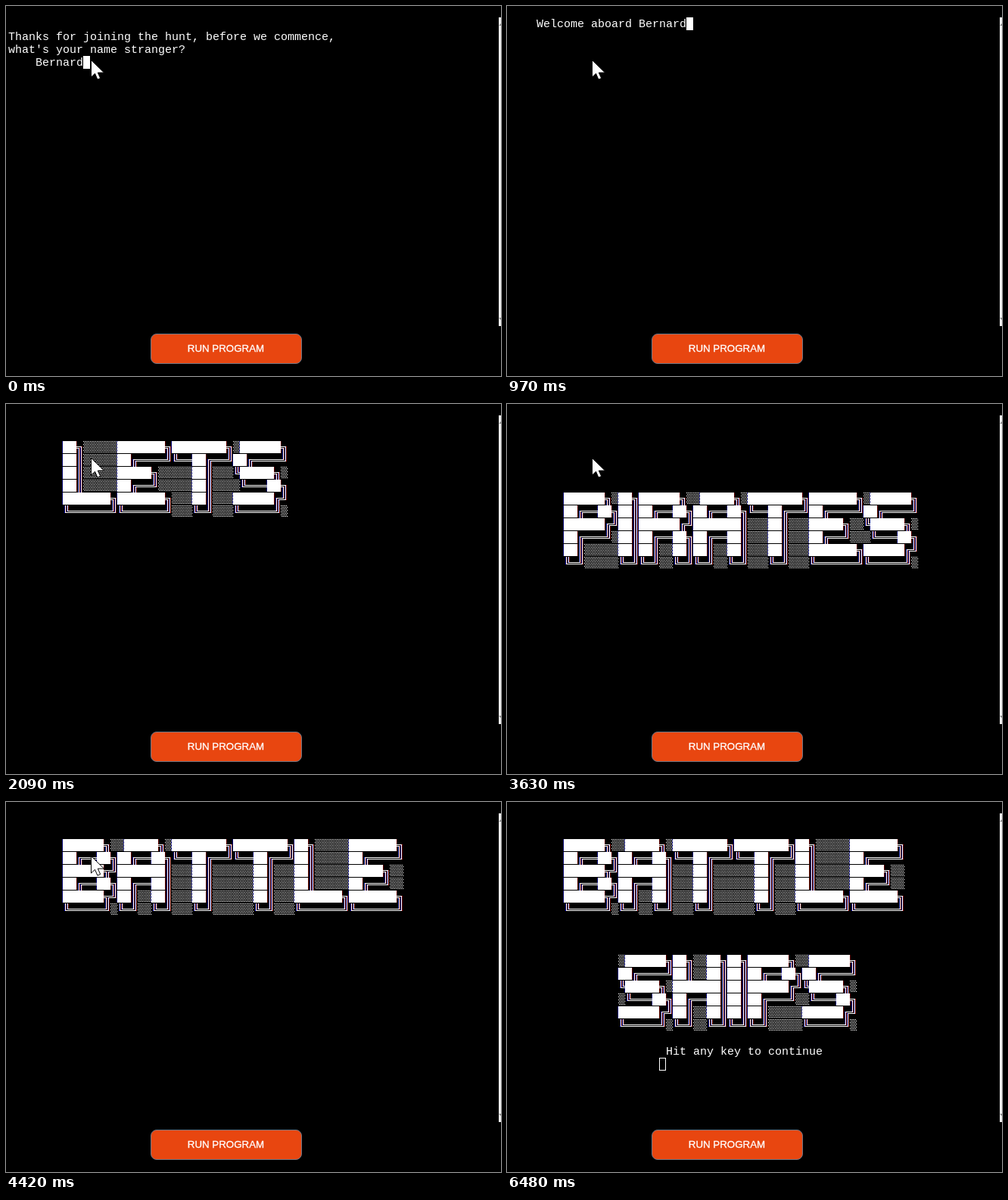
An HTML page with a canvas that plays this animation: 654 px wide and 489 px high, repeating every 6550 ms.

```html
<!DOCTYPE html>
<html lang="en">
<head>
<meta charset="utf-8">
<title>Terminal game intro</title>
<style>
  html, body { margin: 0; width: 100%; height: 100%; overflow: hidden; background: #000; }
  #stage { position: relative; width: 654px; height: 489px; overflow: hidden; background: #000; }
  #stage > * { position: absolute; }
  #art { left: 0; top: 0; }
  #text {
    left: 3px; top: 16px; margin: 0; color: #fff;
    font: 15px/17px "Courier New", "Liberation Mono", monospace;
  }
  #caret { width: 9px; height: 17px; box-sizing: border-box; border: 1px solid #fff; }
  #bar { left: 651px; top: 15px; }
  #run {
    left: 191px; top: 433px; width: 200px; height: 40px; box-sizing: border-box;
    padding: 0 1px 0 0; border: 1px solid #6f7786; border-radius: 8px; background: #e84610; color: #fff;
    font: 13.333px/38px Arial, "Liberation Sans", sans-serif; text-align: center;
    -webkit-text-stroke: .3px #fff;
  }
  #mouse { left: 0; top: 0; overflow: visible; }
</style>
</head>
<body>
<div id="stage">
  <canvas id="art" width="654" height="489"></canvas>
  <pre id="text"></pre>
  <div id="caret"></div>
  <svg id="bar" width="3" height="408">
    <rect width="3" height="408" fill="#f1f1f1"/>
    <path d="M0 11L3 8V11ZM0 397H3V400Z" fill="#8a8a8a"/>
  </svg>
  <div id="run">RUN PROGRAM</div>
  <svg id="mouse" width="18" height="27">
    <path d="M0 0V22.5L5 17.8 8.4 25.6 12.2 24 8.8 16.6H17Z" fill="#fff" stroke="#000"/>
  </svg>
</div>
<script>
const LOOP = 6550, CW = 9, CH = 17, LEFT = 3, TOP = 15;
const X1 = 3, X2 = 6, Y1 = 7, Y2 = 9; // double line offsets in a cell
const $ = id => document.getElementById(id);
const ctx = $('art').getContext('2d');

const LETTERS = {
  A: '░█████╗░ ██╔══██╗ ███████║ ██╔══██║ ██║░░██║ ╚═╝░░╚═╝',
  B: '██████╗░ ██╔══██╗ ██████╦╝ ██╔══██╗ ██████╦╝ ╚═════╝░',
  E: '███████╗ ██╔════╝ █████╗░░ ██╔══╝░░ ███████╗ ╚══════╝',
  H: '██╗░░██╗ ██║░░██║ ███████║ ██╔══██║ ██║░░██║ ╚═╝░░╚═╝',
  I: '██╗ ██║ ██║ ██║ ██║ ╚═╝',
  L: '██╗░░░░░ ██║░░░░░ ██║░░░░░ ██║░░░░░ ███████╗ ╚══════╝',
  N: '███╗░░██╗ ████╗░██║ ██╔██╗██║ ██║╚████║ ██║░╚███║ ╚═╝░░╚══╝',
  P: '██████╗░ ██╔══██╗ ██████╔╝ ██╔═══╝░ ██║░░░░░ ╚═╝░░░░░',
  R: '██████╗░ ██╔══██╗ ██████╔╝ ██╔══██╗ ██║░░██║ ╚═╝░░╚═╝',
  S: '░██████╗ ██╔════╝ ╚█████╗░ ░╚═══██╗ ██████╔╝ ╚═════╝░',
  T: '████████╗ ╚══██╔══╝ ░░░██║░░░ ░░░██║░░░ ░░░██║░░░ ░░░╚═╝░░░',
  U: '██╗░░░██╗ ██║░░░██║ ██║░░░██║ ██║░░░██║ ╚██████╔╝ ░╚═════╝░'
};

// Each word: text, column, row
const LETS = ['LETS', 8, 2], HUNT = ['HUNT', 16, 12], PIRATES = ['PIRATES', 8, 6],
      BATTLE = ['BATTLE', 8, 2], SHIPS = ['SHIPS', 16, 11];
const SCENES = [
  [0, []],
  [2090, [LETS]],
  [2840, [LETS, HUNT]],
  [3630, [PIRATES]],
  [4420, [BATTLE]],
  [5220, [BATTLE, SHIPS]]
];

const QUESTION = "\nThanks for joining the hunt, before we commence,\nwhat's your name stranger?\n    Bernard";
const WELCOME = '    Welcome aboard Bernard';
const PROMPT = '\n'.repeat(18) + ' '.repeat(23) + 'Hit any key to continue';
const MOVES = [4890, 4970, 5050, 5140, 5220];

// White box with subpixel colour on its left and right edges
function box(x, y, w, h) {
  ctx.fillStyle = '#fff';
  ctx.fillRect(x, y, w, h);
  ctx.fillStyle = '#00006e';
  ctx.fillRect(x - 1, y, 1, h);
  ctx.fillStyle = '#5a0000';
  ctx.fillRect(x + w, y, 1, h);
}

const hLine = (x, y, from, to) => box(x + from, y, to - from, 1);
const vLine = (x, y, from, to) => box(x, y + from, 1, to - from);

function bend(x, y, px, py, left, down) {
  hLine(x, y + py, left ? 0 : px, left ? px + 1 : CW);
  vLine(x + px, y, down ? py : 0, down ? CH : py + 1);
}

function corner(x, y, left, down) {
  bend(x, y, left ? X2 : X1, down ? Y1 : Y2, left, down);
  bend(x, y, left ? X1 : X2, down ? Y2 : Y1, left, down);
}

function shade(x, y) {
  const gap = CW / 4;
  ctx.fillStyle = '#fff';
  for (let r = 0; r < 8; r++)
    for (let c = 0; c < 4; c++)
      ctx.fillRect(x + (c + (r % 2) / 2) * gap, y + r * 2, 1.3, 1);
}

const CELLS = {
  '█': (x, y) => box(x, y, CW, CH - 1),
  '░': shade,
  '═': (x, y) => { hLine(x, y + Y1, 0, CW); hLine(x, y + Y2, 0, CW); },
  '║': (x, y) => { vLine(x + X1, y, 0, CH); vLine(x + X2, y, 0, CH); },
  '╗': (x, y) => corner(x, y, true, true),
  '╔': (x, y) => corner(x, y, false, true),
  '╝': (x, y) => corner(x, y, true, false),
  '╚': (x, y) => corner(x, y, false, false),
  '╦': (x, y) => {
    hLine(x, y + Y1, 0, CW);
    bend(x, y, X1, Y2, true, true);
    bend(x, y, X2, Y2, false, true);
  }
};

function drawWord([word, col, row]) {
  for (const letter of word) {
    const rows = LETTERS[letter].split(' ');
    rows.forEach((line, r) => [...line].forEach((ch, c) =>
      CELLS[ch](LEFT + (col + c) * CW, TOP + (row + r) * CH)));
    col += rows[0].length;
  }
}

let shown = null;
function drawScene(t) {
  const scene = SCENES.filter(s => s[0] <= t).pop();
  if (scene === shown) return;
  shown = scene;
  ctx.globalCompositeOperation = 'source-over';
  ctx.clearRect(0, 0, 654, 489);
  ctx.globalCompositeOperation = 'lighter';
  scene[1].forEach(drawWord);
}

function setText(str, col, row, solid = true) {
  if ($('text').textContent !== str) $('text').textContent = str;
  const style = $('caret').style;
  style.display = col < 0 ? 'none' : 'block';
  style.left = LEFT + col * CW + 'px';
  style.top = TOP + row * CH + 'px';
  style.background = solid ? '#fff' : 'none';
}

function drawText(t) {
  if (t < 270) setText(QUESTION, 11, 3);
  else if (t < 2090) {
    const step = Math.min(10, Math.floor((t - 270) / 70));
    const n = Math.floor(step * 2.6);
    setText(WELCOME.slice(0, n), n, 0);
  }
  else if (t < 5220) setText('', -1, 0);
  else setText(PROMPT, 22, 19, t < 6480);
}

function drawMouse(t) {
  const k = MOVES.filter(m => m <= t).length;
  const p = Math.pow(k / MOVES.length, 1.5);
  const style = $('mouse').style;
  style.display = k < MOVES.length ? 'block' : 'none';
  style.transform = `translate(${112.5 + Math.round(60 * p)}px, ${71.5 + Math.round(417 * p)}px)`;
}

const start = performance.now();
function frame() {
  const t = Math.max(0, performance.now() - start) % LOOP;
  drawScene(t);
  drawText(t);
  drawMouse(t);
  requestAnimationFrame(frame);
}
frame();
</script>
</body>
</html>
```
